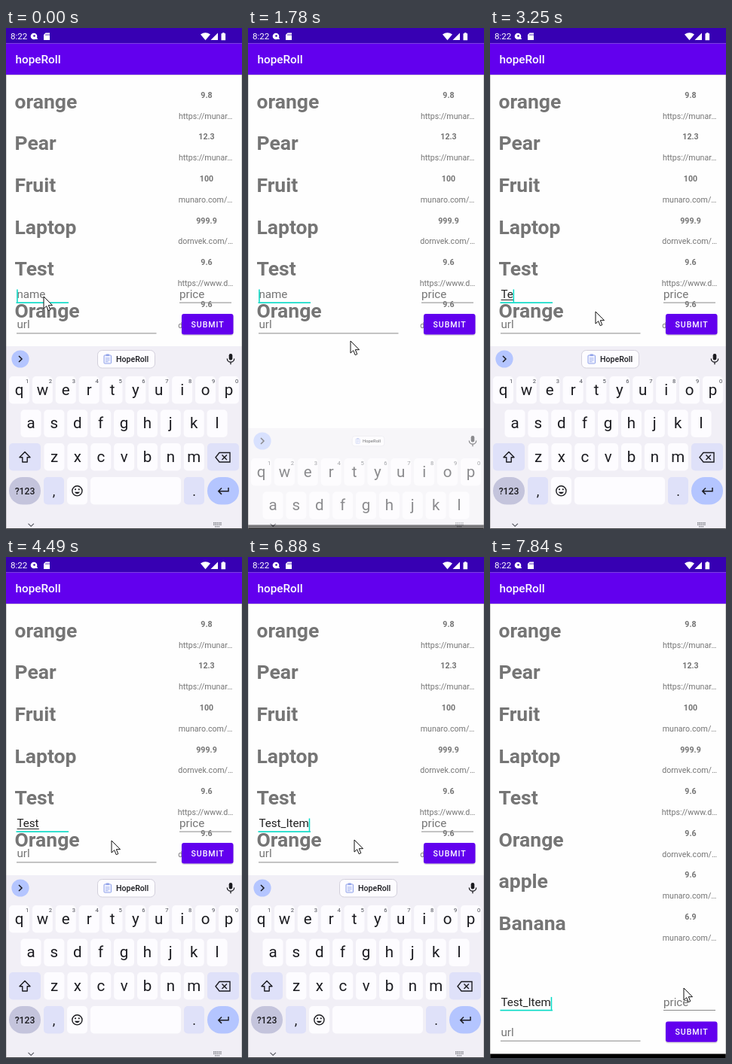
Animation of 313 by 666 pixels, one loop 7990 ms. Source, as an HTML page:

```html
<!DOCTYPE html>
<html lang="en">
<head>
<meta charset="utf-8">
<title>Shopping list</title>
<style>
html, body { margin: 0; width: 100%; height: 100%; overflow: hidden; background: #fefefe; }
svg { position: fixed; inset: 0; width: 100%; height: 100%; display: block; }
text { font-family: Roboto, "Noto Sans", sans-serif; white-space: pre; }
</style>
</head>
<body>
<svg id="stage" viewBox="0 0 313 666" preserveAspectRatio="none"></svg>
<script>
const NS = 'http://www.w3.org/2000/svg';
const stage = document.getElementById('stage');
const LOOP = 7990;
const PURPLE = '#6200ee', TEAL = '#03dac5', GREY = '#757575', INK = '#1b1b20';
const LILAC = '#dfe1f9', BLUE = '#b4c5ff', KEYBED = '#f1eff6';

function el(parent, tag, attrs = {}, content) {
  const node = document.createElementNS(NS, tag);
  for (const k in attrs) node.setAttribute(k, attrs[k]);
  if (content !== undefined) node.textContent = content;
  parent.appendChild(node);
  return node;
}
const group = (p, attrs) => el(p, 'g', attrs);
const rect = (p, x, y, width, height, fill, rx = 0) => el(p, 'rect', { x, y, width, height, fill, rx });
const path = (p, d, attrs) => el(p, 'path', { d, ...attrs });
const line = (p, d, stroke, width = 1.4) => path(p, d, { fill: 'none', stroke, 'stroke-width': width });
const circle = (p, cx, cy, r, fill) => el(p, 'circle', { cx, cy, r, fill });
const label = (p, x, y, size, fill, str, weight = 400, anchor = 'start') =>
  el(p, 'text', { x, y, 'font-size': size, fill, 'font-weight': weight, 'text-anchor': anchor }, str);

// Clip for the part of the list that stays above the keyboard
const clip = el(el(stage, 'defs'), 'clipPath', { id: 'listClip' });
const clipBox = rect(clip, 0, 62, 313, 600, '#000');
const keyClip = el(stage.firstChild, 'clipPath', { id: 'keyClip' });
rect(keyClip, 0, 400, 313, 261, '#000');

rect(stage, 0, 0, 313, 666, '#fefefe');

// List
const list = group(stage, { 'clip-path': 'url(#listClip)' });
[
  ['orange', '9.8', 'https://munar…'],
  ['Pear', '12.3', 'https://munar…'],
  ['Fruit', '100', 'munaro.com/…'],
  ['Laptop', '999.9', 'dornvek.com/…'],
  ['Test', '9.6', 'https://www.d…'],
  ['Orange', '9.6', 'dornvek.com/…'],
  ['apple', '9.6', 'munaro.com/…'],
  ['Banana', '6.9', 'munaro.com/…']
].forEach(([name, price, url], i) => {
  const dy = i * 55.6;
  label(list, 11.5, 106.8 + dy, 26.5, GREY, name, 700);
  label(list, 266, 92.8 + dy, 10.64, GREY, price, 700, 'middle');
  label(list, 264.6, 120.6 + dy, 10.64, GREY, url, 400, 'middle');
});

// Status bar and title
rect(stage, 0, 0, 313, 20.5, '#3700b3');
rect(stage, 0, 20.5, 313, 41.5, PURPLE);
rect(stage, 0, 62, 313, 1, '#0002');
label(stage, 6, 15, 11.6, '#fff', '8:22');
circle(stage, 37, 11, 4.3, '#fff');
circle(stage, 37.5, 10.5, 1.3, '#3700b3');
path(stage, 'M37 15h5l-2-5z', { fill: '#fff' });
path(stage, 'M52.5 6.5h5.5v9.5h-8v-7z', { fill: '#fff' });
line(stage, 'M53 8v2.2M55 8v2.2M57 8v2.2', '#3700b3', 0.8);
path(stage, 'M258 8.5q6.5-4.5 13 0l-6.5 7.8z', { fill: '#fff' });
path(stage, 'M281 6.5v9.5h-9.5z', { fill: '#fff' });
path(stage, 'M285.5 7.3h1.5v-1h2.6v1h1.5v9h-5.6z', { fill: '#fff' });
label(stage, 12.5, 47, 15.3, '#fff', 'hopeRoll', 500);

// Form, drawn at its raised place
const form = group(stage);
const hint = label(form, 14.4, 359.3, 15.2, GREY, 'name');
const typed = label(form, 14.4, 359.3, 15.2, '#212121', '');
const composing = rect(form, 14.6, 361, 0, 1, '#212121');
rect(form, 13.5, 364.4, 69.5, 1.6, TEAL);
const caret = rect(form, 14, 347.5, 1.5, 17, TEAL);
label(form, 230, 359.3, 15.2, GREY, 'price');
rect(form, 230, 364.6, 69, 1, '#8a8a8a');
label(form, 14.4, 399.3, 15.2, GREY, 'url');
rect(form, 14, 405.4, 185.5, 1, '#8a8a8a');
rect(form, 232.5, 381, 69.5, 28, '#0002', 4);
rect(form, 233, 380, 68.5, 27.4, PURPLE, 3);
label(form, 267.6, 397.7, 10.64, '#fff', 'SUBMIT', 500, 'middle').setAttribute('letter-spacing', 0.95);

// Keyboard
const board = group(group(stage, { 'clip-path': 'url(#keyClip)' }));
rect(board, 0, 423, 313, 243, KEYBED);
circle(board, 19, 440, 11.6, BLUE);
line(board, 'M17 436l4 4-4 4', INK, 1.5);
rect(board, 295.7, 433, 4.6, 8.6, INK, 2.3);
line(board, 'M293.3 439.5a4.7 4.7 0 0 0 9.4 0M298 444v3.2', INK, 1.3);

const chip = group(board);
el(chip, 'rect', { x: 121.5, y: 428.5, width: 76, height: 23.5, rx: 6, fill: '#fdfcff', stroke: '#d3d0dc' });
el(chip, 'rect', { x: 130, y: 435, width: 9.5, height: 11, rx: 1, fill: '#eef0ff', stroke: '#8fa1e8' });
rect(chip, 132.5, 433.5, 4.5, 2.6, '#8fa1e8', 1);
line(chip, 'M132 439h5.5M132 441.3h5.5M132 443.6h3.5', '#8fa1e8', 0.8);
label(chip, 146, 444.2, 10.6, INK, 'HopeRoll', 500);

const letters = [];
function keyRow(chars, x0, y, digits) {
  [...chars].forEach((c, i) => {
    const cx = x0 + i * 30.88;
    rect(board, cx - 13.5, y, 27, 36.5, '#fdfcff', 5);
    letters.push(label(board, cx, y + 24.6, 20.5, INK, c, 400, 'middle'));
    if (digits) label(board, cx + 10.6, y + 9, 7.6, '#44464f', (i + 1) % 10, 400, 'middle');
  });
}
keyRow('qwertyuiop', 17.5, 463, true);
keyRow('asdfghjkl', 33, 507.5);
keyRow('zxcvbnm', 64, 552);

rect(board, 4, 552, 42, 36.5, LILAC, 5);
const shift = path(board, 'M25 563.5l7 7.3h-3.8v6.2h-6.4v-6.2H18z',
  { fill: 'none', stroke: INK, 'stroke-width': 1.4, 'stroke-linejoin': 'round' });
rect(board, 267, 552, 42, 36.5, LILAC, 5);
line(board, 'M283 564.5h14v12.5h-14l-5-6.2zM286.5 567.5l6.4 6.4M292.9 567.5l-6.4 6.4', INK);

rect(board, 4, 597, 42, 36.5, '#c4c4dc', 18);
label(board, 25, 620, 12.2, INK, '?123', 500, 'middle');
rect(board, 50, 597, 27, 36.5, LILAC, 5);
label(board, 63.5, 622, 18, INK, ',', 400, 'middle');
rect(board, 81, 597, 27, 36.5, '#fdfcff', 5);
el(board, 'circle', { cx: 94.4, cy: 615.3, r: 6.6, fill: 'none', stroke: INK, 'stroke-width': 1.4 });
circle(board, 92, 613.3, 1.1, INK);
circle(board, 96.8, 613.3, 1.1, INK);
path(board, 'M90.8 616.8h7.2q-3.6 5-7.2 0z', { fill: INK });
rect(board, 112, 597, 120, 36.5, '#fdfcff', 5);
rect(board, 236, 597, 27, 36.5, LILAC, 5);
label(board, 249.5, 622, 18, INK, '.', 400, 'middle');
rect(board, 267, 597, 42, 36.5, BLUE, 18);
line(board, 'M295 611v4.7h-13M286 611.5l-4.2 4.2 4.2 4.2', INK, 1.5);

// Navigation strip
rect(stage, 0, 660.5, 313, 5.5, '#000');
const nav = group(stage);
rect(nav, 0, 660, 313, 5, KEYBED);
line(nav, 'M29.5 658.8l3.7 3.7 3.7-3.7', '#5c5d66', 1.2);
line(nav, 'M275 658h11M275 660.3h11M277 662.8h7', '#74757d', 1.3).setAttribute('stroke-dasharray', '1.5 .8');
rect(nav, 0, 665, 313, 1, '#4a4a4e');

rect(stage, 0, 62, 0.7, 604, '#8888');
rect(stage, 312.3, 62, 0.7, 604, '#8888');

const pointer = path(stage, 'M.5.5V16.6L4.2 13.2 6.7 19.2 9.3 18.1 6.8 12.2H12z',
  { fill: '#fff', stroke: '#111', 'stroke-width': 1, 'stroke-linejoin': 'round' });

// Step tables: [start ms, values...]
const raised = [[0, 1], [520, 0], [1660, 1], [7360, 0]];
const caps = [[0, 0], [2760, 1], [2880, 0]];
const blink = [[0, 1], [120, 0], [1150, 1], [2020, 0], [2510, 1], [4490, 0], [4990, 1],
  [5490, 0], [5740, 1], [7000, 0], [7480, 1]];
const typing = [[0, ''], [2880, 'T'], [3250, 'Te'], [3500, 'Tes'], [3870, 'Test'], [5740, 'Test_'],
  [6130, 'Test_I'], [6250, 'Test_It'], [6370, 'Test_Ite'], [6490, 'Test_Item']];
const hide = t => [[t, 40, 0.75, 0], [t + 120, 109, 0.38, 0], [t + 240, 180, 0.15, 0],
  [t + 360, 230, 0.03, 0], [t + 480, 243, 0, 0]];
// offset, opacity, chip scale
const slide = [[0, 0, 1, 1], ...hide(520), [1540, 230, 0.05, 0], [1660, 190, 0.2, 0.3],
  [1780, 109, 0.5, 0.56], [1900, 40, 0.8, 0.8], [2020, 8, 1, 0.95], [2140, 0, 1, 1], ...hide(7360)];
const mouse = [[0, 50, 357], [760, 50, 420], [880, 50, 500], [1000, 50, 547], [1150, 50, 560],
  [1270, 48, 575], [1420, 48, 578], [1540, 60, 565], [1660, 100, 490], [1780, 136, 416],
  [1900, 139, 395], [2020, 140, 385], [2140, 140, 381], [2260, 140, 377], [6880, 141, 376],
  [7000, 152, 366], [7120, 190, 345], [7240, 225, 331], [7360, 240, 336], [7480, 248, 346],
  [7600, 252, 361], [7720, 255, 480], [7840, 257, 573]];

function at(table, t) {
  let row = table[0];
  for (const r of table) if (r[0] <= t) row = r;
  return row;
}

function draw(t) {
  const up = at(raised, t)[1], word = at(typing, t)[1], upper = at(caps, t)[1];
  const [, offset, alpha, scale] = at(slide, t);
  const [, mx, my] = at(mouse, t);

  form.setAttribute('transform', `translate(0 ${up ? 0 : 237.4})`);
  clipBox.setAttribute('height', up ? 352 : 598);
  hint.setAttribute('opacity', word ? 0 : 1);
  typed.textContent = word;
  const width = word ? typed.getComputedTextLength() : 0;
  composing.setAttribute('width', word.includes('_') ? 0 : width);
  caret.setAttribute('x', 14.2 + Math.min(width, 67));
  caret.setAttribute('opacity', at(blink, t)[1]);

  board.setAttribute('transform', `translate(0 ${offset})`);
  board.setAttribute('opacity', alpha);
  nav.setAttribute('opacity', alpha);
  chip.setAttribute('opacity', scale ? 1 : 0);
  chip.setAttribute('transform', `translate(159.5 440) scale(${scale || 1}) translate(-159.5 -440)`);
  for (const key of letters) {
    key.textContent = upper ? key.textContent.toUpperCase() : key.textContent.toLowerCase();
  }
  shift.setAttribute('fill', upper ? INK : 'none');
  pointer.setAttribute('transform', `translate(${mx - 0.5} ${my - 0.5})`);
}

const start = performance.now();
function tick() {
  draw((performance.now() - start) % LOOP);
  requestAnimationFrame(tick);
}
tick();
</script>
</body>
</html>
```
